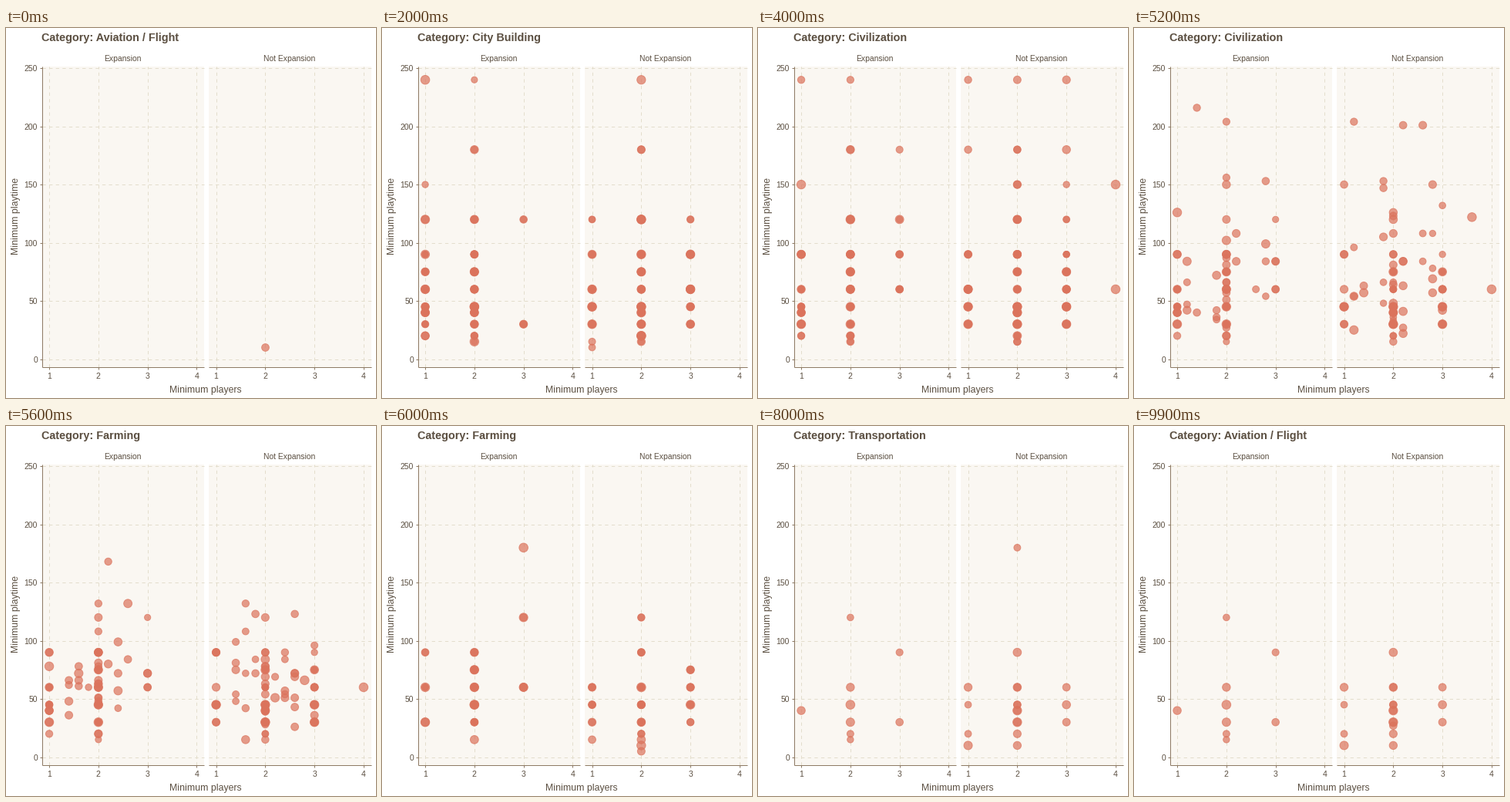
A matplotlib script for the animation above (10 s loop, 480 by 480 pixels).

```python
import math
import random

import matplotlib.pyplot as plt
import numpy as np
from matplotlib.animation import FuncAnimation

SIZE, DPI = 480, 72
HOLD, MOVE = 10, 10
TEXT, LINE, GRID, PANEL, DOT = "#5b4f41", "#8d7a64", "#e3ddcc", "#faf7f2", "#db735c"
LEFT = (46.5, 263)
WIDTH, TOP, BOTTOM = 210.5, 49.5, 439.7
TIMES = (5, 10, 15, 20, 30, 40, 45, 60, 75, 90, 120, 150, 180, 240)

rng = random.Random(12)


def px(panel, x):
    return LEFT[panel] + (x - 0.85) / 3.3 * WIDTH


def py(y):
    return BOTTOM - (y + 6.75) / 258.5 * (BOTTOM - TOP)


def span(lo, hi, *skip):
    """Usual playtimes from lo to hi."""
    return [t for t in TIMES if lo <= t <= hi and t not in skip]


def scatter(panel, crowd, columns):
    """Dots (x, y, radius) in pixels, piling up near 2 players and 50 minutes."""
    dots = []
    for players, times in columns.items():
        for t in times:
            spread = math.log2(t / 50) ** 2 + (players - 2) ** 2
            copies = max(1, round(1.5 * crowd * math.exp(-0.4 * spread)))
            dots += [(px(panel, players), py(t), rng.uniform(4.5, 6.3))
                     for _ in range(copies)]
    return dots


def tracks(start, end):
    """Random pairs, long games leaving first; unpaired dots stay in place."""
    def height(dot):
        return BOTTOM - dot[1]

    start = sorted(start, key=lambda d: rng.random() / height(d))
    end = rng.sample(end, len(end))
    return list(zip(start, end + start[len(end):]))


# Category: crowd and playtimes by players, for expansions and for base games
CATEGORIES = {
    "Aviation / Flight": ((0, {}), (0, {2: [10]})),
    "City Building": (
        (4, {1: span(20, 240, 180), 2: span(15, 240, 150), 3: range(30, 121, 90)}),
        (4, {1: span(10, 120, 20, 40, 75), 2: span(15, 240, 150),
             3: span(30, 120, 40, 75)})),
    "Civilization": (
        (4, {1: span(20, 240, 75, 120, 180), 2: span(15, 240, 40, 150),
             3: span(60, 180, 75, 150)}),
        (4, {1: span(30, 240, 40, 75, 120, 150), 2: span(15, 240),
             3: span(30, 240, 40), 4: range(60, 151, 90)})),
    "Farming": (
        (3, {1: range(30, 91, 30), 2: range(15, 91, 15), 3: range(60, 181, 60)}),
        (3, {1: range(15, 61, 15), 2: span(5, 120, 40, 75),
             3: range(30, 76, 15)})),
    "Transportation": (
        (0.9, {1: [40], 2: span(15, 120, 40, 75, 90), 3: range(30, 91, 60)}),
        (1.3, {1: span(10, 60, 15, 30, 40), 2: span(10, 180, 15, 75, 120, 150),
               3: range(30, 61, 15)})),
}
NAMES = list(CATEGORIES)
STATES = [[scatter(p, *spec) for p, spec in enumerate(pair)]
          for pair in CATEGORIES.values()]
TRACKS = [np.array([t for a, b in zip(now, nxt) for t in tracks(a, b)])
          for now, nxt in zip(STATES, STATES[1:] + STATES[:1])]

plt.rcParams["font.family"] = "Liberation Sans"
fig = plt.figure(figsize=(SIZE / DPI, SIZE / DPI), dpi=DPI, facecolor="white")
ax = fig.add_axes([0, 0, 1, 1])
ax.set(xlim=(0, SIZE), ylim=(SIZE, 0))
ax.axis("off")


def line(x, y, color, **kw):
    ax.plot(x, y, color=color, lw=1, solid_capstyle="butt", **kw)


def label(x, y, s, size=10.4, **kw):
    return ax.text(x, y, s, size=size, color=TEXT, **kw)


for p, strip in enumerate(("Expansion", "Not Expansion")):
    x0, x1 = LEFT[p], LEFT[p] + WIDTH
    ax.add_patch(plt.Rectangle((x0, TOP), WIDTH, BOTTOM - TOP, fc=PANEL, lw=0))
    for v in range(0, 251, 50):
        line([x0, x1], [py(v)] * 2, GRID, dashes=(4.3, 4.3))
    for v in range(1, 5):
        x = px(p, v)
        line([x, x], [BOTTOM, TOP], GRID, dashes=(4.3, 4.3))
        line([x, x], [BOTTOM, BOTTOM + 3], LINE)
        label(x, 455, str(v), ha="center")
    line([x0, x1], [BOTTOM] * 2, LINE)
    label((x0 + x1) / 2 - 0.5, 43, strip, ha="center")

line([LEFT[0]] * 2, [TOP, BOTTOM], LINE)
for v in range(0, 251, 50):
    line([LEFT[0] - 3, LEFT[0]], [py(v)] * 2, LINE)
    label(41, py(v) + 4, str(v), ha="right")

label(259.3, 473, "Minimum players", 12.3, ha="center")
label(16.5, 244.5, "Minimum playtime", 12.3, ha="center", rotation=90,
      rotation_mode="anchor")
title = label(46.5, 17, "", 14.4, weight="bold")
cloud = ax.scatter([], [], s=[], fc=DOT, ec=DOT, lw=1, alpha=0.7, zorder=3)


def draw(i):
    k, step = divmod(i, HOLD + MOVE)
    t = max(0, step - HOLD) / MOVE
    start, end = TRACKS[k][:, 0], TRACKS[k][:, 1]
    dots = start + (end - start) * t
    cloud.set_offsets(dots[:, :2])
    cloud.set_sizes((2 * dots[:, 2] - 1) ** 2, DPI)
    title.set_text("Category: " + NAMES[k if t <= 0.5 else (k + 1) % len(NAMES)])
    return cloud, title


anim = FuncAnimation(fig, draw, frames=len(NAMES) * (HOLD + MOVE), interval=100,
                     repeat=True, repeat_delay=0)
plt.show()
```
